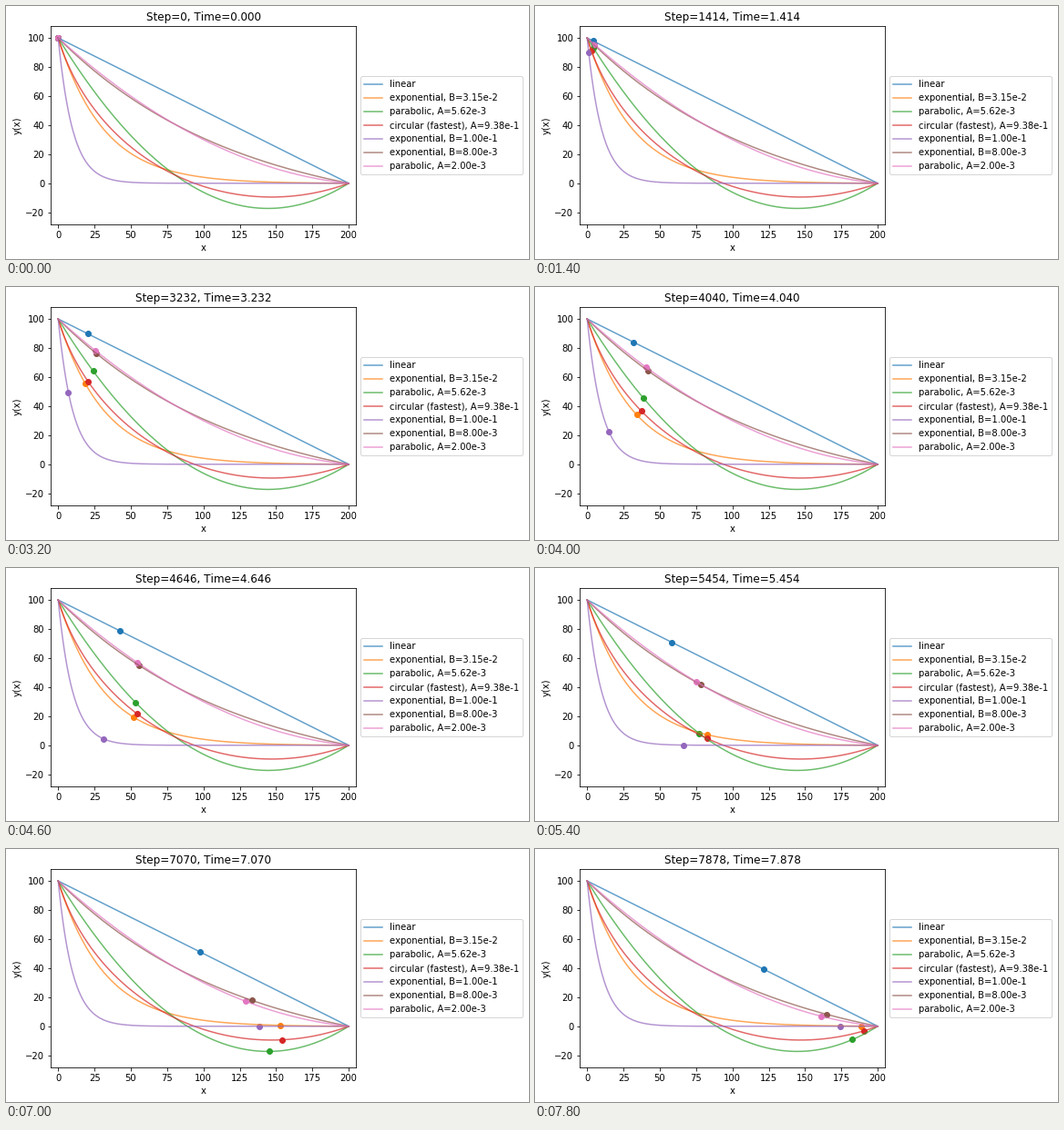
Recreate the animation shown at these times as a matplotlib script. Size 574 by 278 pixels, loop 8 s.

```python
import numpy as np
import matplotlib.pyplot as plt
from matplotlib.animation import FuncAnimation

W, H, DPI = 574, 278, 72
FRAMES, INTERVAL = 40, 200
STEP, DT = 202, 0.001
G = 9.8
X1, Y0 = 200, 100  # every track runs from (0, Y0) to (X1, 0)


def linear(x):
    return Y0 * (1 - x / X1)


def exponential(b):
    end = np.exp(-b * X1)
    return lambda x: Y0 * (np.exp(-b * x) - end) / (1 - end)


def parabolic(a):
    return lambda x: Y0 - (Y0 / X1 + a * X1) * x + a * x**2


def circular(a):
    # centre lies on the chord's normal, a half-chords from its midpoint
    cx, cy = X1 / 2 + a * Y0 / 2, Y0 / 2 + a * X1 / 2
    r = np.hypot(cx, Y0 - cy)
    return lambda x: cy - np.sqrt(r**2 - (x - cx) ** 2)


TRACKS = [
    ("linear", linear),
    ("exponential, B=3.15e-2", exponential(3.15e-2)),
    ("parabolic, A=5.62e-3", parabolic(5.62e-3)),
    ("circular (fastest), A=9.38e-1", circular(9.38e-1)),
    ("exponential, B=1.00e-1", exponential(1e-1)),
    ("exponential, B=8.00e-3", exponential(8e-3)),
    ("parabolic, A=2.00e-3", parabolic(2e-3)),
]


def slide(curve, times):
    """x of a frictionless bead released from rest at x = 0."""
    u = np.linspace(0, np.sqrt(X1), 4001)  # x = u**2 removes the start singularity
    x = u**2
    mid = ((u[1:] + u[:-1]) / 2) ** 2
    ds = np.hypot(np.diff(x), np.diff(curve(x)))
    speed = np.sqrt(2 * G * (Y0 - curve(mid)))
    t = np.concatenate([[0], np.cumsum(ds / speed)])
    return np.interp(times, t, x)


times = np.arange(FRAMES) * STEP * DT
paths = []
for _, curve in TRACKS:
    px = slide(curve, times)
    paths.append(np.column_stack([px, curve(px)]))

plt.rcParams.update({
    "font.family": "DejaVu Sans",
    "font.size": 10,
    "text.kerning_factor": 6,
})
fig = plt.figure(figsize=(W / DPI, H / DPI), dpi=DPI, facecolor="white")
ax = fig.add_axes([49.3 / W, 38.2 / H, 334.8 / W, 217.44 / H])
ax.set(xlim=(-5, 205), ylim=(-28.2, 108), xlabel="x", ylabel="y(x)")
ax.set_xticks(range(0, 201, 25))
ax.set_yticks(range(-20, 101, 20))

xs = np.linspace(0, X1, 401)
beads = []
for i, (label, curve) in enumerate(TRACKS):
    ax.plot(xs, curve(xs), color=f"C{i}", alpha=0.7, label=label)
    beads.append(ax.scatter([0], [Y0], color=f"C{i}"))
ax.legend(loc="center left", bbox_to_anchor=(1, 0.5))
title = ax.set_title("")


def update(k):
    step = k * STEP
    title.set_text(f"Step={step}, Time={step * DT:.3f}")
    for bead, path in zip(beads, paths):
        bead.set_offsets(path[k])
    return [title, *beads]


anim = FuncAnimation(fig, update, frames=FRAMES, interval=INTERVAL,
                     init_func=lambda: update(0), repeat=True, repeat_delay=0)
plt.show()
```
